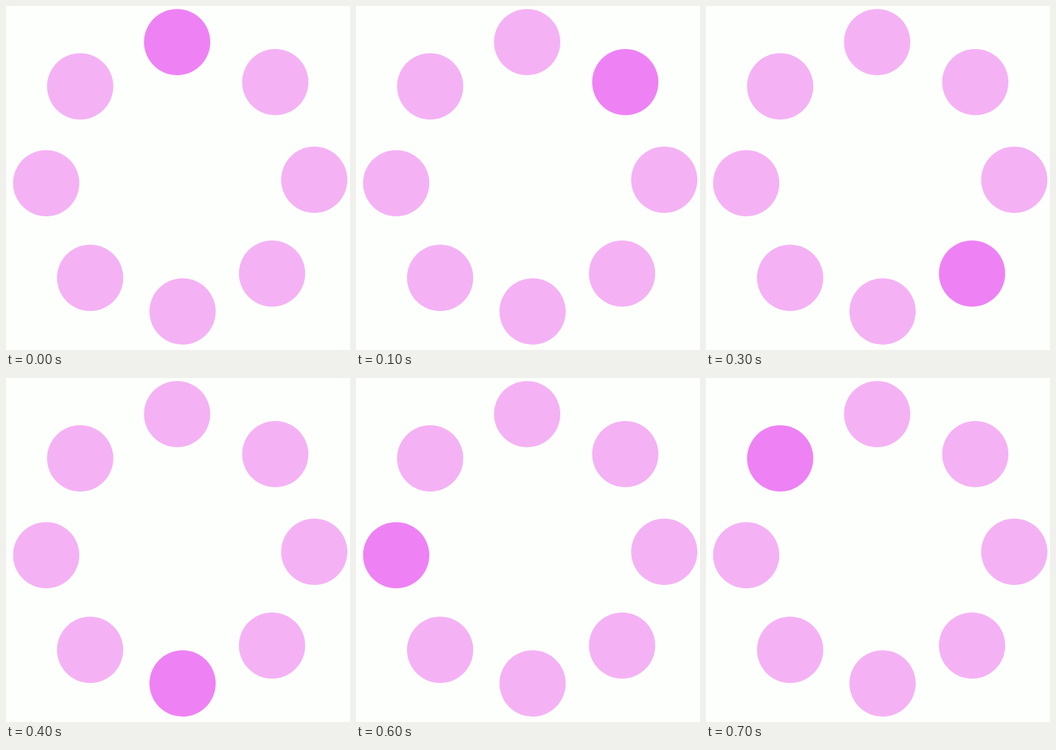
Recreate the animation shown at these times as an HTML page. Size 512 by 512 pixels, loop 0.8 s.

```html
<!DOCTYPE html>
<html lang="en">
<head>
<meta charset="utf-8">
<title>Loading ring</title>
<style>
  html, body {
    margin: 0;
    width: 100%;
    height: 100%;
    overflow: hidden;
    background: #fdfffc;
  }
  svg {
    display: block;
    width: 100%;
    height: 100%;
  }
  circle {
    r: 49.3px;
    fill: #f4b2f4;
    animation: lit 800ms step-end infinite;
    animation-delay: calc(var(--i) * 100ms - 800ms);
  }
  @keyframes lit {
    0% { fill: #ee82f4; }
    12.5%, 100% { fill: #f4b2f4; }
  }
</style>
</head>
<body>
<svg viewBox="0 0 512 512">
  <circle style="--i:0" cx="254.7" cy="53.7" r="49.3"/>
  <circle style="--i:1" cx="400.8" cy="113.3" r="49.3"/>
  <circle style="--i:2" cx="458.8" cy="258.6" r="49.3"/>
  <circle style="--i:3" cx="396" cy="398.2" r="49.3"/>
  <circle style="--i:4" cx="262.8" cy="454.6" r="49.3"/>
  <circle style="--i:5" cx="125.2" cy="404.6" r="49.3"/>
  <circle style="--i:6" cx="59.8" cy="263.7" r="49.3"/>
  <circle style="--i:7" cx="110.4" cy="119.6" r="49.3"/>
</svg>
</body>
</html>
```
